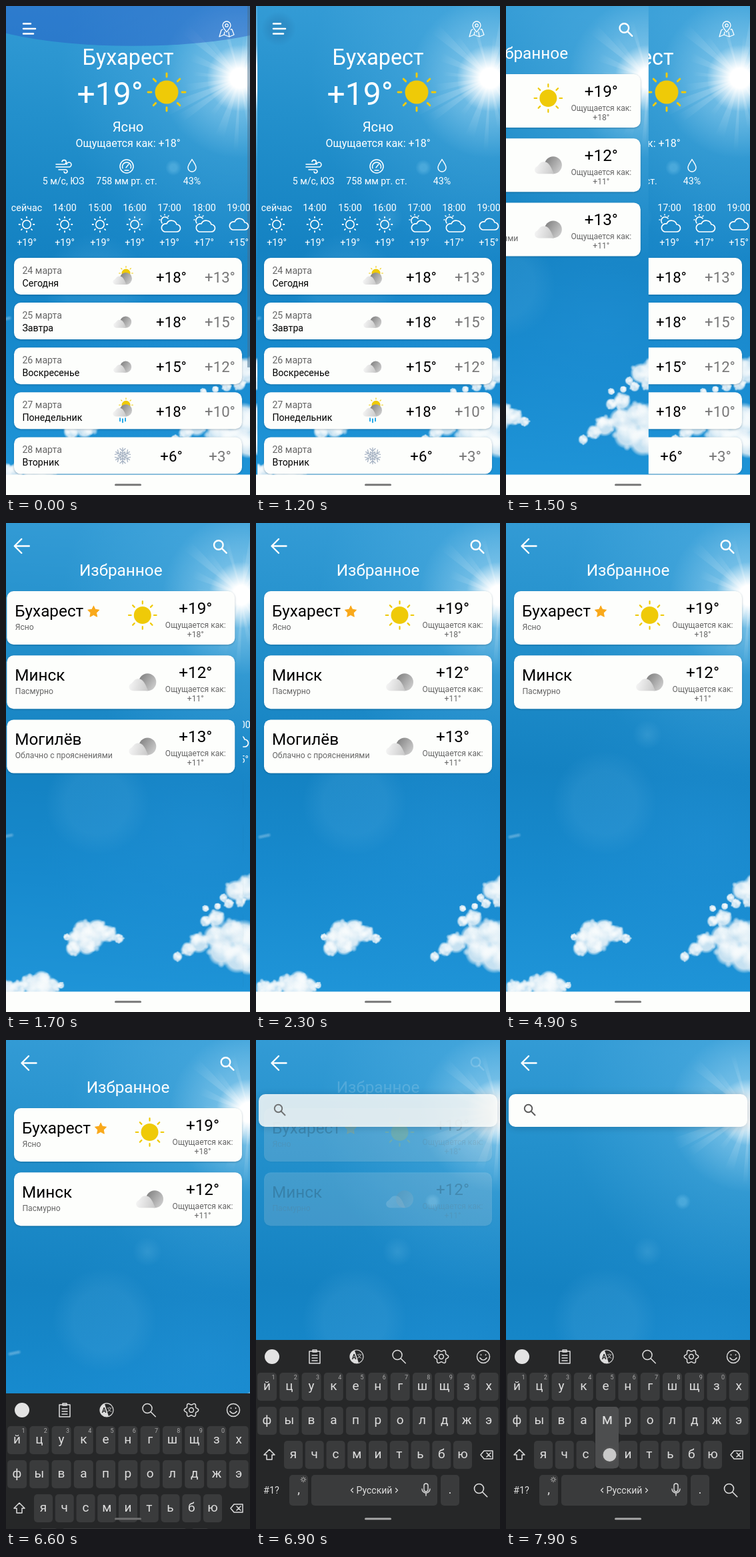
Animation, 366 px wide and 732 px high, one loop 8000 ms. Source, as an HTML page with a canvas:

```html
<!DOCTYPE html>
<html lang="ru">
<head>
<meta charset="utf-8">
<style>
html, body { margin: 0; width: 100%; height: 100%; overflow: hidden; background: #188bd0; }
canvas { display: block; width: 366px; height: 732px; }
</style>
</head>
<body>
<canvas id="stage" width="366" height="732"></canvas>
<script>
const W = 366, H = 732, LOOP = 8000;
const TAU = Math.PI * 2;
let c = document.getElementById('stage').getContext('2d');

const clamp = v => Math.max(0, Math.min(1, v));
const span = (t, from, to) => clamp((t - from) / (to - from));
const easeOut = p => 1 - (1 - p) ** 2;
const easeInOut = p => (1 - Math.cos(Math.PI * p)) / 2;

function text(str, x, y, size, color = '#fff', align = 'center', weight = 400) {
  c.font = `${weight} ${size}px Roboto, sans-serif`;
  c.textAlign = align;
  c.fillStyle = color;
  c.fillText(str, x, y);
}
function disc(x, y, r, color) {
  c.beginPath();
  c.arc(x, y, r, 0, TAU);
  c.fillStyle = color;
  c.fill();
}
function ring(x, y, r, color, width) {
  c.beginPath();
  c.arc(x, y, r, 0, TAU);
  stroke(color, width);
}
function stroke(color, width, path) {
  c.strokeStyle = color;
  c.lineWidth = width;
  c.lineCap = c.lineJoin = 'round';
  path ? c.stroke(path) : c.stroke();
}
function icon(x, y, d, color = '#fff', width = 1.6) {
  c.save();
  c.translate(x, y);
  stroke(color, width, new Path2D(d));
  c.restore();
}
function box(x, y, w, h, r, color) {
  c.beginPath();
  c.roundRect(x, y, w, h, r);
  c.fillStyle = color;
  c.fill();
}
function card(x, y, w, h, r, blur = 3) {
  c.save();
  c.shadowColor = 'rgba(0,40,70,.3)';
  c.shadowBlur = blur;
  c.shadowOffsetY = 1;
  box(x, y, w, h, r, '#fdfefc');
  c.restore();
}
function glow(x, y, r, rgb, alpha, solid = 0) {
  const g = c.createRadialGradient(x, y, 0, x, y, r);
  g.addColorStop(0, `rgba(${rgb},${alpha})`);
  if (solid) g.addColorStop(solid, `rgba(${rgb},${alpha})`);
  g.addColorStop(1, `rgba(${rgb},0)`);
  disc(x, y, r, g);
}
function rays(x, y, from, to, color, width, count = 8) {
  c.beginPath();
  for (let i = 0; i < count; i++) {
    const a = i * TAU / count, cos = Math.cos(a), sin = Math.sin(a);
    c.moveTo(x + cos * from, y + sin * from);
    c.lineTo(x + cos * to, y + sin * to);
  }
  stroke(color, width);
}

// Sky, painted once and shared by every page
function paintSky() {
  const sky = document.createElement('canvas');
  sky.width = W + 20;
  sky.height = H;
  const screen = c;
  c = sky.getContext('2d');
  let seed = 7;
  const rnd = () => (seed = seed * 16807 % 2147483647) / 2147483647;

  const g = c.createLinearGradient(60, 0, 0, H);
  [[0, '#339bd5'], [.22, '#2390cc'], [.5, '#1482c2'], [.72, '#178ace'], [1, '#2197da']]
    .forEach(stop => g.addColorStop(...stop));
  c.fillStyle = g;
  c.fillRect(0, 0, W + 20, H);
  glow(300, 470, 240, '40,150,222', .35);

  // Sun with a soft halo and faint beams
  const sx = 365, sy = 108;
  glow(sx, sy, 270, '105,190,235', .45);
  glow(sx, sy, 120, '195,232,250', .6);
  for (let i = 0; i < 22; i++) {
    const a = (i + rnd()) * TAU / 22, len = 60 + rnd() * 70, half = .03 + rnd() * .05;
    const beam = c.createRadialGradient(sx, sy, 10, sx, sy, len);
    beam.addColorStop(0, 'rgba(255,255,255,.28)');
    beam.addColorStop(1, 'rgba(255,255,255,0)');
    c.beginPath();
    c.moveTo(sx, sy);
    c.arc(sx, sy, len, a - half, a + half);
    c.fillStyle = beam;
    c.fill();
  }
  glow(sx, sy, 50, '255,255,255', 1, .3);

  glow(148, 419, 78, '95,178,225', .17, .6);
  glow(212, 317, 22, '130,200,235', .2);
  glow(265, 242, 12, '130,205,240', .35, .4);

  // Clouds: a dense body, ragged edges, then lit and shaded lumps
  const puffs = [
    [126, 609, 14], [147, 607, 13], [116, 623, 13], [140, 621, 17], [164, 615, 12], [180, 622, 7],
    [102, 620, 5], [112, 637, 11], [132, 634, 12],
    [354, 550, 14], [374, 546, 18], [337, 561, 6], [345, 570, 7], [364, 566, 9], [328, 574, 5],
    [326, 592, 12], [310, 596, 8], [310, 577, 5], [348, 613, 18],
    [370, 620, 24], [324, 619, 16], [300, 629, 14], [284, 638, 10], [268, 649, 7], [334, 642, 19],
    [358, 652, 20], [378, 655, 20],
    [64, 684, 13], [80, 693, 11], [46, 689, 13], [93, 692, 5], [12, 697, 12], [28, 697, 11], [60, 700, 18]
  ];
  const scatter = (x, y, r, reach, count, paint) => {
    for (let i = 0; i < count; i++) {
      const a = rnd() * TAU, d = Math.sqrt(rnd()) * r * reach;
      paint(x + Math.cos(a) * d, y + Math.sin(a) * d, Math.sin(a) * d / r);
    }
  };
  puffs.forEach(([x, y, r]) => {
    glow(x, y, r * 1.12, '222,237,246', .88, .68);
    scatter(x, y, r, 1.05, 8, (px, py) => glow(px, py, r * .3, '228,240,248', .6, .3));
  });
  puffs.forEach(([x, y, r]) => scatter(x, y, r, .75, 9, (px, py, low) =>
    glow(px, py, r * .55, low > .3 ? '196,222,238' : '252,254,254', low > .3 ? .22 : .5)));
  for (let i = 0; i < 5; i++) glow(6 + i * 3.3, 470 - i * .7, 4, '190,222,242', .35);
  c = screen;
  return sky;
}
const sky = paintSky();

// Weather icons
function sun(x, y, r) {
  disc(x, y, r, '#efca08');
  rays(x, y, r * 1.32, r * 1.6, '#efca08', r * .17);
}
function greyCloud(x, y, s) {
  c.save();
  c.translate(x, y);
  c.scale(s, s);
  const back = c.createLinearGradient(-4, -8, 19, 8);
  back.addColorStop(0, '#858585');
  back.addColorStop(1, '#cecece');
  disc(7, 0, 13, back);
  const front = c.createLinearGradient(-18, 0, 12, 8);
  front.addColorStop(0, '#f2f2f2');
  front.addColorStop(1, '#c4c4c4');
  c.fillStyle = front;
  c.fill(new Path2D('M8 13H-14C-20 13-23 7-19 3-15 2-14-5-7-5-1-5 2 0 4 4Z'));
  c.restore();
}
function dailyIcon(kind, x, y) {
  if (kind === 'snow') {
    for (let i = 0; i < 6; i++) {
      c.save();
      c.translate(x, y);
      c.rotate(i * TAU / 6);
      stroke('#aab6c6', 1.4, new Path2D('M0 0V-12M-4-11 0-7 4-11M-3-6 0-3 3-6'));
      c.restore();
    }
    return;
  }
  if (kind === 'cloud') return greyCloud(x, y + 1, .66);
  const cy = kind === 'rain' ? y - 1 : y + 3;
  sun(x + 5, cy - 8, 6.5);
  greyCloud(x, cy, .7);
  if (kind === 'rain') icon(x, y + 11, 'M-4 0V4M0 1V6M4 0V4', '#27a9e8', 2);
}
const CLOUD = 'M-9 8H9A5.5 5.5 0 0 0 9-3A8 8 0 0 0-6-4A6 6 0 0 0-9 8Z';
function hourIcon(kind, x, y) {
  if (kind === 'sun') {
    ring(x, y, 6.2, '#fff', 1.6);
    rays(x, y, 10, 11.4, '#fff', 1.8);
  } else if (kind === 'both') {
    icon(x + 2, y + 3, CLOUD, '#fff', 1.7);
    icon(x - 7, y - 7, 'M-4 5A5 5 0 1 1 5-2M-7 0H-8M-5-5-6-6M0-7V-8M5-5 6-6');
  } else icon(x, y, CLOUD, '#fff', 1.7);
}
function magnifier(x, y, r, color, width) {
  ring(x, y, r, color, width);
  icon(x, y, `M${r * .75} ${r * .75}L${r * 1.75} ${r * 1.75}`, color, width);
}
const backArrow = () => icon(34, 34.5, 'M11.5 0H-10M0-10.5-10.5 0 0 10.5', '#fff', 2.4);

// Pages
const hours = [
  ['сейчас', 'sun', 19, 31], ['14:00', 'sun', 19, 88], ['15:00', 'sun', 19, 141], ['16:00', 'sun', 19, 193],
  ['17:00', 'both', 19, 245], ['18:00', 'both', 17, 297], ['19:00', 'cloud', 15, 349]
];
const days = [
  ['24 марта', 'Сегодня', 'partly', 18, 13], ['25 марта', 'Завтра', 'cloud', 18, 15],
  ['26 марта', 'Воскресенье', 'cloud', 15, 12], ['27 марта', 'Понедельник', 'rain', 18, 10],
  ['28 марта', 'Вторник', 'snow', 6, 3]
];
const places = [
  ['Бухарест', 'Ясно', 19, 18], ['Минск', 'Пасмурно', 12, 11], ['Могилёв', 'Облачно с прояснениями', 13, 11]
];

function mainPage(t) {
  c.drawImage(sky, -14, 0);
  const recede = 1 - easeOut(span(t, 0, 800));
  if (recede > 0) {
    c.beginPath();
    c.ellipse(190, 0, 260, 60 * recede, 0, 0, TAU);
    c.fillStyle = `rgba(40,85,195,${.45 * recede})`;
    c.fill();
  }
  const bar = 1 - span(t, 250, 600);
  c.fillStyle = `rgba(70,110,140,${.5 * bar})`;
  c.fillRect(362, 0, 4, 541);

  const tap = span(t, 950, 1150) * (1 - span(t, 1250, 1700));
  if (tap > 0) glow(34, 34, 26, '30,80,130', .16 * tap, .5);
  icon(34, 34, 'M-8-7.5H3M-8 0H10M-8 7.5H7', '#fff', 2.5);
  icon(331, 35, 'M0 4C-4-1-6-3-6-6A6 6 0 0 1 6-6C6-3 4-1 0 4ZM-6 0-8 1-11 11-4 8 4 11 11 8 8 0 6 0M-4 8-3 4M4 11 3 4', '#fff', 1.3);
  ring(331, 29, 2.2, '#fff', 1.3);

  text('Бухарест', 183, 88, 32.3);
  text('+19°', 156, 148, 48);
  sun(241, 129, 17.5);
  text('Ясно', 183, 188, 20.2);
  text('Ощущается как: +18°', 183, 211, 16);

  icon(86, 240, 'M-11-3H1A3.2 3.2 0 1 0-2-7M-11 1H8A3.5 3.5 0 1 0 5-3M-7 5H3A2.5 2.5 0 1 1 1 8');
  ring(181, 240, 10, '#fff', 1.5);
  icon(181, 240, 'M-6 3A6.5 6.5 0 1 1 6 3M-1 2 3-3M-3 6H3', '#fff', 1.4);
  icon(279, 239, 'M0-9.5C3-4 6-1 6 3A6 6 0 0 1-6 3C-6-1-3-4 0-9.5Z', '#fff', 1.4);
  text('5 м/с, ЮЗ', 86, 267, 14.2);
  text('758 мм рт. ст.', 181, 267, 14.2);
  text('43%', 279, 267, 14.2);

  for (const [label, kind, temp, x] of hours) {
    text(label, x, 307, 14.3);
    hourIcon(kind, x, 327);
    text(`+${temp}°`, x, 359, 14.3);
  }
  days.forEach(([date, name, kind, hi, lo], i) => {
    const y = 377 + i * 67.1;
    card(12, y, 342, 55, 10);
    text(date, 24.4, y + 24, 14.2, '#666', 'left');
    text(name, 24.4, y + 43, 14.2, '#000', 'left');
    dailyIcon(kind, 175, y + 28);
    text(`+${hi}°`, 248, y + 36.5, 22.2, '#000');
    text(`+${lo}°`, 321, y + 36.5, 22.2, '#777');
  });
}

function star(x, y, r) {
  c.beginPath();
  for (let i = 0; i < 10; i++) {
    const a = i * TAU / 10 - TAU / 4, d = i % 2 ? r * .5 : r;
    c.lineTo(x + Math.cos(a) * d, y + Math.sin(a) * d);
  }
  c.closePath();
  c.fillStyle = '#f9a91b';
  c.fill();
  stroke('#f9a91b', 1);
}

function favouritesContent(t) {
  const tap = span(t, 5950, 6050) * (1 - span(t, 6100, 6400));
  if (tap > 0) glow(331, 35, 26, '30,80,130', .16 * tap, .5);
  magnifier(329.5, 33, 6.8, '#fff', 2.4);
  text('Избранное', 183, 79, 24.3);
  places.forEach(([name, state, temp, feels], i) => {
    const swipe = i === 2 ? span(t, 3430, 4000) ** 2 : 0;
    if (swipe === 1) return;
    c.save();
    c.translate(-366 * swipe, i * 96.2);
    card(12, 102, 342, 80, 10);
    text(name, 24, 140, 24.3, '#000', 'left');
    text(state, 24.4, 160, 12.2, '#666', 'left');
    if (i === 0) {
      star(142, 133, 9);
      sun(215.5, 138, 13);
    } else greyCloud(216, 142, 1);
    text(`+${temp}°`, 295, 136, 24.3, '#000');
    text('Ощущается как:', 295, 157, 12.1, '#666');
    text(`+${feels}°`, 295, 171, 12.1, '#666');
    c.restore();
  });
}

function searchBar(t) {
  card(4, 81, 358, 49, 10, 12);
  magnifier(33.5, 102.5, 5.7, '#5d5d5d', 2);
  if (t >= 7200 && t < 7700) {
    c.fillStyle = '#1d8bd0';
    c.fillRect(61, 97, 2, 20);
  }
}

function keyboard(top, t) {
  const ink = '#dedede';
  c.save();
  c.translate(0, top - 449);
  c.fillStyle = '#262728';
  c.fillRect(0, 449, W, 284);

  disc(24, 474, 11, '#e3e3e3');
  icon(88, 474, 'M-8-8H8V10H-8ZM-3-10H3V-7H-3ZM-4-2H4M-4 2H4M-4 6H4', ink, 1.5);
  ring(151, 474, 10, ink, 1.2);
  c.beginPath();
  c.arc(151, 474, 10, TAU * .2, TAU * .7);
  c.fillStyle = ink;
  c.fill();
  text('A', 147, 478, 10, '#262728', 'center', 700);
  text('文', 155, 476, 8, ink);
  magnifier(212, 471.5, 7, ink, 1.5);
  c.beginPath();
  for (let i = 0; i <= 72; i++) {
    const a = i * TAU / 72, r = 9.2 + 1.5 * Math.cos(a * 6);
    c.lineTo(278 + Math.cos(a) * r, 474 + Math.sin(a) * r);
  }
  stroke(ink, 1.5);
  ring(278, 474, 3.4, ink, 1.5);
  ring(341, 474, 9.5, ink, 1.5);
  icon(341, 474, 'M-5 2Q0 8 5 2M-3.5-3V-2.6M3.5-3V-2.6', ink, 1.7);

  const key = (x, y, w, h = 42) => box(x - w / 2, y, w, h, 5, '#3a3b3c');
  const row = (letters, x0, pitch, y, w, digits) => [...letters].forEach((ch, i) => {
    const x = x0 + i * pitch;
    key(x, y, w);
    text(ch, x, y + 26, 19, ink);
    if (digits && i < 10) text((i + 1) % 10, x + 9.5, y + 10, 9, '#aaa');
  });
  row('йцукенгшщзх', 16.5, 33.27, 498, 29, true);
  row('фывапролджэ', 16.5, 33.27, 549, 29);
  row('ячсмитьбю', 56, 31.75, 600, 28);
  icon(20, 621, 'M0-8 8 0H4V7H-4V0H-8Z', ink, 1.5);
  icon(346, 621, 'M-4-6H9V6H-4L-9 0ZM0-3 6 3M6-3 0 3', ink, 1.5);

  text('#1?', 23, 679, 14.5, ink);
  key(64, 651, 28, 46);
  text(',', 64, 679, 19, ink);
  ring(71, 658, 2.2, '#aaa', 1);
  rays(71, 658, 3, 4, '#aaa', 1);
  key(177.5, 651, 189, 46);
  text('Русский', 177.5, 679, 14, ink);
  icon(144, 674, 'M1.5-3-1.5 0 1.5 3', ink, 1.2);
  icon(211, 674, 'M-1.5-3 1.5 0-1.5 3', ink, 1.2);
  icon(255, 673, 'M-3-6A3 3 0 0 1 3-6V0A3 3 0 0 1-3 0ZM-6-1A6 6 0 0 0 6-1M0 5V9', ink, 1.4);
  key(291, 651, 28, 46);
  text('.', 291, 679, 19, ink);
  magnifier(334.5, 671.5, 7, ink, 1.6);

  if (t >= 7850) {
    box(134, 549, 35, 92, 5, '#4d4e4f');
    text('м', 152, 575, 22, ink);
  }
  c.restore();
}

function touch(x, y, alpha) {
  c.save();
  c.globalAlpha = alpha;
  glow(x, y, 14, '90,90,90', .6, .6);
  disc(x, y, 10, '#d0d0d0');
  c.restore();
}

function draw(t) {
  const slide = easeInOut(span(t, 1172, 1766));
  const rise = easeOut(span(t, 6460, 6761));
  const search = span(t, 6650, 6950);

  if (slide < 1) mainPage(t);
  if (slide > 0) {
    c.save();
    c.translate(W * (slide - 1), 0);
    c.beginPath();
    c.rect(0, 0, W, H);
    c.clip();
    c.drawImage(sky, 0, 0);
    backArrow();
    c.globalAlpha = 1 - search;
    if (search < 1) favouritesContent(t);
    c.globalAlpha = search;
    if (search > 0) searchBar(t);
    c.restore();
  }

  c.fillStyle = '#fdfefc';
  c.fillRect(0, 701.5, W, 31);
  if (rise > 0) keyboard(H - 283 * rise, t);
  box(163, 715.3, 40, 3, 1.5, rise > 0 ? (rise < 1 ? '#707070' : '#a5a5a5') : '#777');

  if (t >= 1000 && t < 1100) touch(34, 34, .7);
  if (t >= 3500 && t < 3850) touch(270 - 366 * span(t, 3430, 4000) ** 2, 336, .7);
  if (t >= 6000 && t < 6100) touch(331, 35, .7);
  if (t >= 7800) touch(155.5, 621, .95);
}

function frame() {
  draw(performance.now() % LOOP);
  requestAnimationFrame(frame);
}
frame();
</script>
</body>
</html>
```
